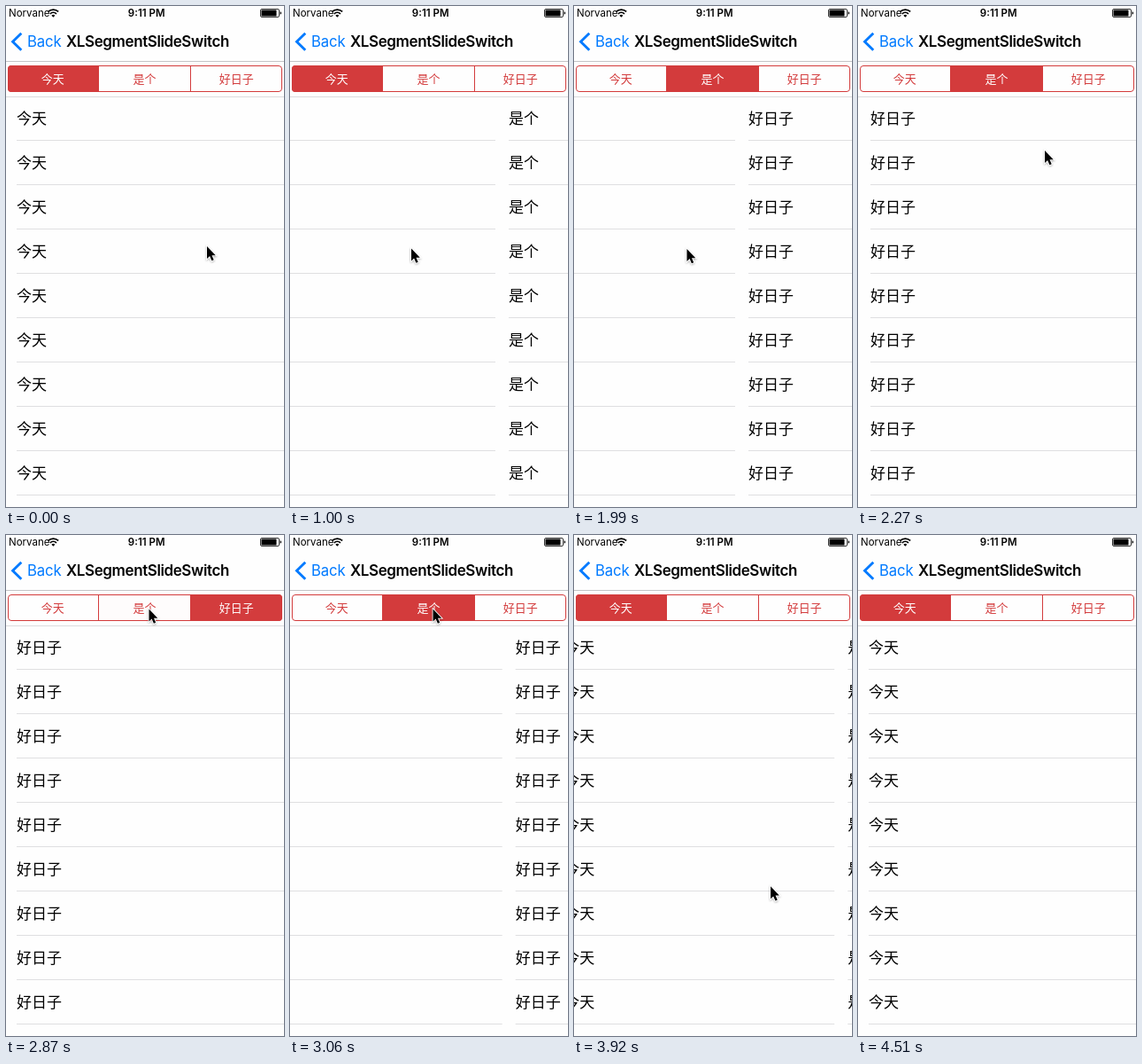
Recreate the animation shown at these times as an HTML page. Size 314 by 565 pixels, loop 4.84 s.

```html
<!DOCTYPE html>
<html lang="zh-CN">
<head>
<meta charset="utf-8">
<title>XLSegmentSlideSwitch</title>
<style>
  html, body { margin: 0; width: 100%; height: 100%; overflow: hidden; background: #fefefe; }
  svg { display: block; width: 100%; height: 100%; }
  text { font-family: Inter, "Noto Sans CJK SC", "Noto Sans CJK", sans-serif; }
  .cjk { font-family: "Noto Sans CJK SC", "Noto Sans CJK", sans-serif; }
</style>
</head>
<body>
<svg id="stage" viewBox="0 0 314 565">
  <defs>
    <clipPath id="round"><rect x="2" y="67" width="310" height="30" rx="4"/></clipPath>
    <filter id="shade" x="-50%" y="-50%" width="200%" height="200%">
      <feDropShadow dx="0" dy="1" stdDeviation=".8" flood-opacity=".35"/>
    </filter>
  </defs>
  <rect width="314" height="565" fill="#fefefe"/>
  <g id="pages"></g>

  <rect width="314" height="102" fill="#fefefe"/>
  <path d="M0 62.5H314" stroke="#c4c4c6"/>
  <path d="M0 102.5H314" stroke="#dcdcde"/>

  <text x="3" y="12.3" font-size="11.5">Norvane</text>
  <g fill="none" stroke="#000" stroke-width="1.7">
    <path d="M47.6 6.4a8.4 8.4 0 0 1 11.6 0"/>
    <path d="M49.8 8.8a5.2 5.2 0 0 1 7.2 0"/>
  </g>
  <path d="M53.4 12.8l-2-2a2.9 2.9 0 0 1 4 0z"/>
  <text x="158.7" y="12.3" font-size="11.5" font-weight="600" text-anchor="middle">9:11 PM</text>
  <rect x="287.5" y="3.5" width="21" height="9" rx="1.5" fill="none" stroke="#000" stroke-width=".8"/>
  <rect x="288.5" y="4.5" width="17" height="7" rx=".6"/>
  <path d="M309.6 6.3q1.5 .3 1.5 1.7t-1.5 1.7z"/>

  <path d="M17.3 30.8L7.6 40.3L17.3 49.8" fill="none" stroke="#007aff" stroke-width="2.9"/>
  <text x="24" y="46" font-size="16.8" letter-spacing="-.2" fill="#007aff">Back</text>
  <text x="68" y="46" font-size="17" font-weight="600" letter-spacing="-.4">XLSegmentSlideSwitch</text>

  <g id="segments" clip-path="url(#round)"></g>
  <g fill="none" stroke="#d33b3c">
    <rect x="2.5" y="67.5" width="309" height="29" rx="3.5"/>
    <path d="M104.5 67V97M208.5 67V97"/>
  </g>
  <g id="labels"></g>

  <path id="cursor" d="M0 0V14L3.1 11.1L5.4 16.2L7.7 15.2L5.5 10.2H9.8Z"
        stroke="#fff" stroke-width="1.6" paint-order="stroke" filter="url(#shade)"/>
</svg>
<script>
const LOOP = 4840, PAGE = 320;
const titles = ['今天', '是个', '好日子'];
const RED = [211, 59, 60];

const $ = id => document.getElementById(id);
function add(parent, tag, attrs, content) {
  const el = document.createElementNS('http://www.w3.org/2000/svg', tag);
  for (const k in attrs) el.setAttribute(k, attrs[k]);
  if (content) el.textContent = content;
  return parent.appendChild(el);
}

titles.forEach((title, i) => {
  const x = 12 + i * PAGE;
  for (let y = 102; y < 552; y += 50) {
    add($('pages'), 'text', { class: 'cjk', x, y: y + 31, 'font-size': 17 }, title);
    add($('pages'), 'path', { d: `M${x} ${y + 49.5}h305`, stroke: '#dfdfe1' });
  }
});

const segs = titles.map((title, i) => ({
  fill: add($('segments'), 'rect', {
    x: [2, 104, 208][i], y: 67, width: [103, 105, 104][i], height: 30, fill: `rgb(${RED})`
  }),
  label: add($('labels'), 'text', {
    class: 'cjk', x: 52.7 + 103.8 * i, y: 86.8, 'font-size': 13, 'text-anchor': 'middle'
  }, title)
}));

const smooth = u => u * u * (3 - 2 * u);
const out = u => 1 - (1 - u) ** 3;
const settle = u => u < 1 ? 1 - 2 ** (-10 * u) : 1;

// Each key: [time, values, easing used to arrive there]
const scroll = [
  [0, [0]], [710, [0]], [710, [69]], [850, [85], out], [1020, [85]], [1360, [320], settle],
  [1635, [320]], [1780, [455], out], [2050, [455]], [2390, [640], settle],
  [2891, [640]], [3141, [320], smooth], [3670, [320]], [3970, [0], smooth]
];
const pointer = [
  [0, [227, 271]], [710, [227, 271]], [710, [154, 272]], [850, [137, 273.5], out],
  [1030, [137, 273.5]], [1370, [266, 273], smooth],
  [1635, [266, 273]], [1780, [127.5, 274], out],
  [2050, [127.5, 274]], [2270, [211, 163], smooth], [2490, [177, 95.5], smooth],
  [2540, [177, 95.5]], [2640, [161.5, 83.5], out],
  [3100, [161.5, 83.5]], [3320, [65.5, 83.5], smooth],
  [3680, [65.5, 83.5]], [4030, [269, 490], smooth],
  [4170, [269, 490]], [4510, [283, 568], smooth]
];
// Selection changes: [time, segment, fade length]
const picks = [[0, 0, 0], [1360, 1, 0], [2390, 2, 0], [2870, 1, 105], [3540, 0, 105]];

function sample(keys, t) {
  let i = keys.length - 1;
  while (keys[i][0] > t) i--;
  const [t0, from] = keys[i], next = keys[i + 1];
  if (!next) return from;
  const u = (next[2] || (v => v))((t - t0) / (next[0] - t0));
  return from.map((v, k) => v + (next[1][k] - v) * u);
}

function levels(t) {
  let i = picks.length - 1;
  while (picks[i][0] > t) i--;
  const [start, now, fade] = picks[i];
  const p = fade ? Math.min(1, (t - start) / fade) : 1;
  const level = [0, 0, 0];
  if (i) level[picks[i - 1][1]] = 1 - p;
  level[now] = p;
  return level;
}

function draw(t) {
  const [offset] = sample(scroll, t);
  $('pages').setAttribute('transform', `translate(${-offset.toFixed(2)} 0)`);
  levels(t).forEach((a, i) => {
    segs[i].fill.setAttribute('opacity', a);
    segs[i].label.setAttribute('fill', `rgb(${RED.map(c => Math.round(c + (255 - c) * a))})`);
  });
  const [x, y] = sample(pointer, t);
  $('cursor').setAttribute('transform', `translate(${x.toFixed(2)} ${y.toFixed(2)})`);
  $('cursor').setAttribute('visibility', t < 4510 ? 'visible' : 'hidden');
}

const begin = performance.now();
function tick() {
  draw((performance.now() - begin) % LOOP);
  requestAnimationFrame(tick);
}
tick();
</script>
</body>
</html>
```
